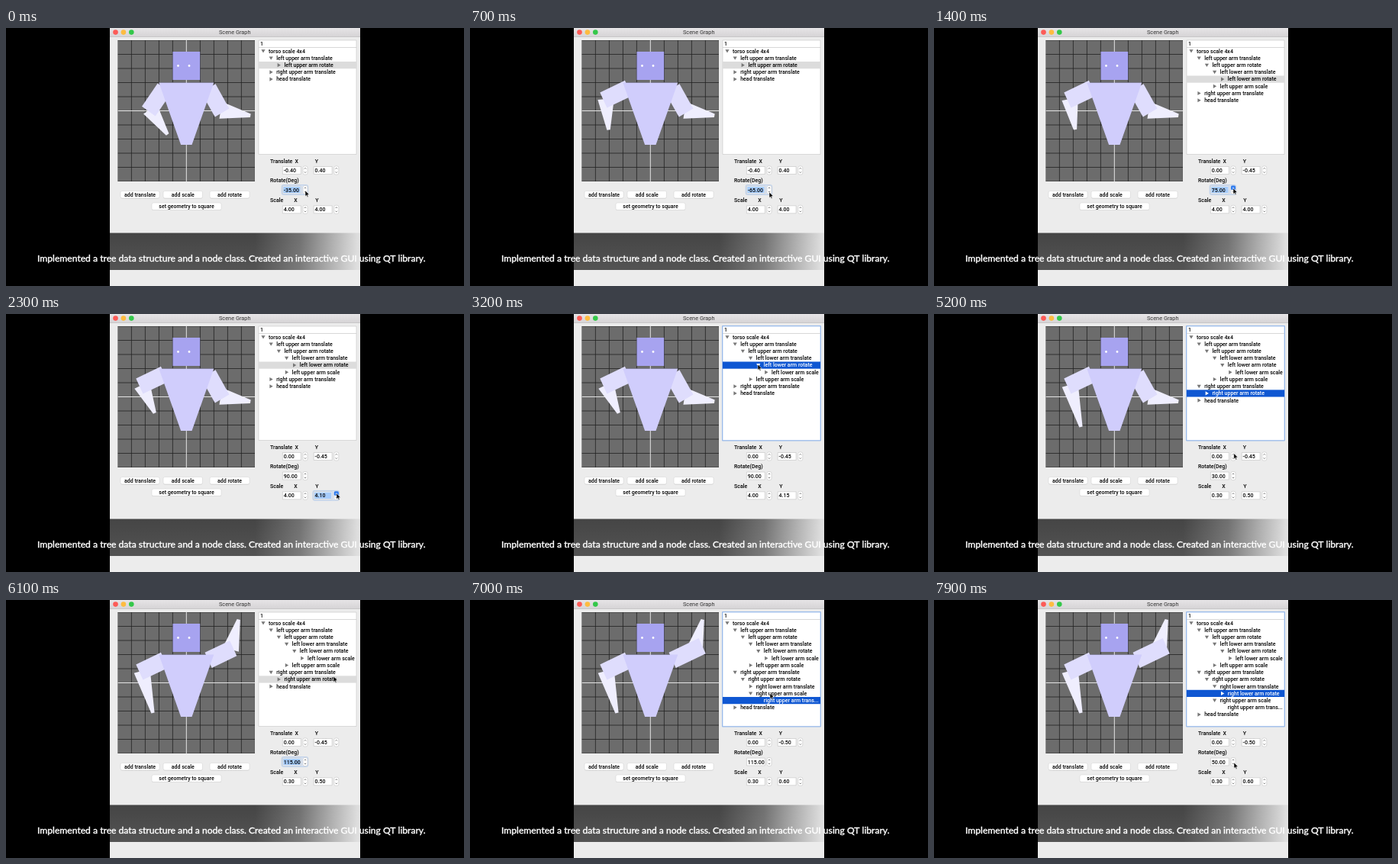
Recreate the animation shown at these times as an HTML page with a canvas. Size 600 by 338 pixels, loop 8 s.

```html
<!DOCTYPE html>
<html lang="en">
<head>
<meta charset="utf-8">
<title>Scene Graph</title>
<style>
html, body { margin: 0; width: 100%; height: 100%; overflow: hidden; background: #000; }
canvas { display: block; width: 600px; height: 338px; }
</style>
</head>
<body>
<canvas id="stage"></canvas>
<script>
const W = 600, H = 338, LOOP = 8000, STEP = 100;
const canvas = document.getElementById('stage');
const ctx = canvas.getContext('2d');
const dpr = window.devicePixelRatio || 1;
canvas.width = W * dpr;
canvas.height = H * dpr;

const UI_FONT = 'Roboto, Inter, sans-serif';

// [id, label, children]
const TREE = ['torso', 'torso scale 4x4', [
  ['lut', 'left upper arm translate', [
    ['lur', 'left upper arm rotate', [
      ['llt', 'left lower arm translate', [
        ['llr', 'left lower arm rotate', [
          ['lls', 'left lower arm scale', [[]]]]]]],
      ['lus', 'left upper arm scale', [[]]]]]]],
  ['rut', 'right upper arm translate', [
    ['rur', 'right upper arm rotate', [
      ['rlt', 'right lower arm translate', [
        ['rlr', 'right lower arm rotate', [[]]]]],
      ['rus', 'right upper arm scale', [
        ['rug', 'right upper arm trans...', []]]]]]]],
  ['head', 'head translate', [[]]]]];

const START = {
  open: 'torso lut', sel: 'lur', focus: 'rot', press: 0,
  tx: -0.4, ty: 0.4, rot: -35, sx: 4, sy: 4,
  leftUp: -35, leftLow: 70, leftLen: 0.5, rightUp: 30, rightLen: 0.5
};

const events = [];
const at = (time, change) => events.push([time, change]);

// Repeated clicks on a stepper: the field and the pose value move together.
function clicks(time, gap, field, pose, from, to, step) {
  const n = Math.round(Math.abs(to - from) / step);
  const dir = Math.sign(to - from);
  for (let i = 1; i <= n; i++) {
    const v = from + dir * step * i;
    const change = { focus: field, press: dir, [field]: v };
    if (pose) change[pose] = v;
    at(time + (i - 1) * gap, change);
  }
  at(time + n * gap, { press: 0 });
}

clicks(100, 100, 'rot', 'leftUp', -35, -65, 5);
at(900, { open: 'torso lut lur', focus: 'tree' });
at(1000, { open: 'torso lut lur llt', sel: 'llt', tx: 0, ty: -0.45 });
at(1100, { sel: 'llr', rot: 70 });
clicks(1400, 100, 'rot', 'leftLow', 70, 90, 5);
clicks(2200, 100, 'sy', null, 4, 4.15, 0.05);
at(2900, { focus: 'tree' });
at(3100, { open: 'torso lut lur llt llr' });
at(3300, { sel: 'lls', sx: 0.3, sy: 0.5 });
clicks(3500, 100, 'sy', 'leftLen', 0.5, 0.7, 0.05);
at(3900, { sel: 'llr', focus: 'tree', press: 0 });
clicks(4000, 100, 'rot', 'leftLow', 90, 105, 5);
clicks(4300, 100, 'rot', 'leftLow', 105, 80, 5);
at(4900, { sel: 'lus', focus: 'tree', sx: 0.3, sy: 0.5 });
at(5000, { open: 'torso lut lur llt llr rut' });
at(5100, { sel: 'rur', rot: 30 });
clicks(5300, 40, 'rot', 'rightUp', 30, 115, 5);
at(6200, { open: 'torso lut lur llt llr rut rur', focus: 'tree' });
at(6300, { sel: 'rus', sx: 0.3, sy: 0.5 });
clicks(6500, 100, 'sy', 'rightLen', 0.5, 0.6, 0.05);
at(6800, { open: 'torso lut lur llt llr rut rur rus', focus: 'tree' });
at(6900, { sel: 'rug', tx: 0, ty: -0.5 });
at(7300, { open: 'torso lut lur llt llr rut rur rus rlt' });
at(7500, { sel: 'rlr', rot: 50 });

// [time, x, y]
const MOUSE = [
  [0, 392, 213], [700, 392, 215], [900, 357, 48], [1000, 368, 58],
  [1100, 400, 67], [1300, 392, 210], [1800, 392, 210], [2100, 433, 235],
  [2500, 433, 235], [2900, 395, 67], [3100, 378, 66], [3200, 377, 66],
  [3300, 405, 76], [3450, 433, 235], [3800, 433, 235], [3900, 410, 67],
  [4000, 392, 210], [4200, 392, 210], [4300, 390, 213], [4700, 390, 213],
  [4900, 400, 85], [5000, 347, 94], [5100, 395, 104], [5250, 392, 210],
  [5950, 392, 210], [6100, 429, 100], [6200, 357, 104], [6300, 395, 122],
  [6450, 433, 235], [6650, 433, 235], [6800, 368, 122], [6900, 395, 131],
  [7000, 393, 122], [7300, 368, 113], [7500, 395, 122], [7900, 393, 213]
];

function stateAt(t) {
  const s = { ...START };
  for (const [time, change] of events) if (time <= t) Object.assign(s, change);
  return s;
}

function mouseAt(t) {
  const i = MOUSE.findIndex(k => k[0] > t);
  if (i < 0) return MOUSE[MOUSE.length - 1].slice(1);
  const a = MOUSE[i - 1], b = MOUSE[i];
  const u = (t - a[0]) / (b[0] - a[0]);
  const e = u * u * (3 - 2 * u);
  return [a[1] + (b[1] - a[1]) * e, a[2] + (b[2] - a[2]) * e];
}

function rect(x, y, w, h, fill) {
  ctx.fillStyle = fill;
  ctx.fillRect(x, y, w, h);
}

function box(x, y, w, h, r, fill, stroke, lw = 0.6) {
  ctx.beginPath();
  ctx.roundRect(x, y, w, h, r);
  ctx.fillStyle = fill;
  ctx.fill();
  if (!stroke) return;
  ctx.strokeStyle = stroke;
  ctx.lineWidth = lw;
  ctx.stroke();
}

function poly(points, fill) {
  ctx.beginPath();
  points.forEach(p => ctx.lineTo(p[0], p[1]));
  ctx.closePath();
  ctx.fillStyle = fill;
  ctx.fill();
}

function dot(x, y, r, fill) {
  ctx.beginPath();
  ctx.arc(x, y, r, 0, 7);
  ctx.fillStyle = fill;
  ctx.fill();
}

function text(str, x, y, color = '#000', align = 'left', font = '500 7px ') {
  ctx.font = font + UI_FONT;
  ctx.textAlign = align;
  ctx.fillStyle = color;
  ctx.fillText(str, x, y);
}

// Figure coordinates: the torso is one unit wide and y points up.
const OX = 236.3, OY = 108.5, UX = 72, UY = 74;
const place = ([x, y]) => [OX + x * UX, OY - y * UY];

function joint(x, y, deg) {
  const a = deg * Math.PI / 180, c = Math.cos(a), s = Math.sin(a);
  return ([px, py]) => [x + px * c - py * s, y + px * s + py * c];
}

function arm(side, up, low, upLen, lowLen) {
  const upper = joint(side * 0.4, 0.4, up);
  const [ex, ey] = upper([0, -0.45]);
  const lower = joint(ex, ey, up + low);
  const tip = -1.1 * lowLen;
  poly([[-0.15, 0], [0.15, 0], [0.03, tip], [-0.03, tip]].map(p => place(lower(p))), '#efeefe');
  poly([[-0.15, 0], [0.15, 0], [0.15, -upLen], [-0.15, -upLen]].map(p => place(upper(p))), '#dfddfd');
}

function drawScene(s) {
  ctx.save();
  ctx.beginPath();
  ctx.rect(146.6, 16, 179.4, 185);
  ctx.clip();
  rect(146, 16, 180, 185, '#6c6c6c');
  for (let i = -5; i <= 5; i++) {
    if (!i) continue;
    rect(OX + i * 18 - 0.4, 16, 0.8, 185, '#222');
    rect(146, OY + i * 18.5 - 0.4, 180, 0.8, '#222');
  }
  rect(OX - 0.5, 16, 1, 185, '#e4e4e4');
  rect(146, OY - 0.5, 180, 1, '#e4e4e4');
  arm(-1, s.leftUp, s.leftLow, 0.5, s.leftLen);
  arm(1, s.rightUp, 50, s.rightLen, 0.5);
  poly([[-0.5, 0.5], [0.5, 0.5], [0.1, -0.6], [-0.1, -0.6]].map(place), '#d0cdfc');
  rect(218.5, 31, 35.7, 37, '#a7a3f0');
  dot(225.5, 49.5, 1.4, '#fff');
  dot(240, 49.5, 1.4, '#fff');
  ctx.restore();
}

function drawTree(s) {
  const focus = s.focus === 'tree';
  if (focus) box(330, 15, 130, 151.5, 1, '#9dbdeb');
  box(331, 16, 128, 149.5, 0, '#fff', focus ? '#8fb4e8' : '#c4c4c4', 0.6);
  rect(331, 25, 128, 0.7, '#c8c8c8');
  text('1', 333, 23.2);
  const open = s.open.split(' ');
  let row = 0;
  const visit = ([id, label, kids], depth) => {
    const y = 30.2 + 9.22 * row++;
    const x = 344 + 10.2 * depth;
    const sel = id === s.sel, isOpen = open.includes(id);
    if (sel) rect(331, y - 4.6, 128, 9.2, focus ? '#0f57d2' : '#dcdcdc');
    const ax = x - 7, mark = sel && focus ? '#fff' : '#777';
    if (kids.length) {
      poly(isOpen
        ? [[ax - 2.6, y - 2], [ax + 2.6, y - 2], [ax, y + 2.4]]
        : [[ax - 1.8, y - 2.6], [ax + 2.5, y], [ax - 1.8, y + 2.6]], mark);
    }
    text(label, x, y + 2.4, sel && focus ? '#fff' : '#000');
    if (isOpen) kids.forEach(k => visit(k, depth + 1));
  };
  visit(TREE, 0);
}

function chevron(x, y, dir, color) {
  ctx.beginPath();
  ctx.moveTo(x - 1.2, y + dir * 0.6);
  ctx.lineTo(x, y - dir * 0.6);
  ctx.lineTo(x + 1.2, y + dir * 0.6);
  ctx.strokeStyle = color;
  ctx.lineWidth = 0.7;
  ctx.stroke();
}

function spin(s, key, x, y) {
  const focus = s.focus === key, press = focus ? s.press : 0;
  if (focus) box(x - 1.2, y - 1.4, 34.5, 12.8, 2, '#d9e4f4', '#b4cbea', 0.8);
  box(x, y, 24, 10, 0, '#fff', '#c2c2c2');
  if (focus) rect(x + 0.8, y + 0.8, 22.4, 8.4, '#a6ccfb');
  text(s[key].toFixed(2), x + 1.4, y + 7.5);
  const bx = x + 26.6;
  box(bx, y - 0.5, 6, 11, 2, '#fff', '#c6c6c6');
  if (press) box(bx, press > 0 ? y - 0.5 : y + 5, 6, 5.5, 1.5, '#2f7cf0');
  chevron(bx + 3, y + 2.5, 1, press > 0 ? '#fff' : '#444');
  chevron(bx + 3, y + 7.5, -1, press < 0 ? '#fff' : '#444');
}

function button(label, x, y, w) {
  box(x, y + 0.4, w, 9.6, 2, '#cfcfcf');
  box(x, y, w, 9.4, 2, '#fff', '#d2d2d2', 0.5);
  text(label, x + w / 2, y + 7.2, '#000', 'center');
}

function drawPanel(s) {
  button('add translate', 150, 213.5, 51);
  button('add scale', 206, 213.5, 51.5);
  button('add rotate', 267, 213.5, 52);
  button('set geometry to square', 191, 229, 91);
  text('Translate', 346, 176.8);
  text('X', 378.5, 176.8);
  text('Y', 404.7, 176.8);
  text('Rotate(Deg)', 346, 202.3);
  text('Scale', 346, 228);
  text('X', 377.3, 228);
  text('Y', 405.3, 228);
  spin(s, 'tx', 362.4, 181.5);
  spin(s, 'ty', 403.2, 181.5);
  spin(s, 'rot', 362.4, 207);
  spin(s, 'sx', 362.4, 232.8);
  spin(s, 'sy', 403.2, 232.8);
}

function drawWindow() {
  rect(0, 0, W, H, '#000');
  rect(136, 0, 328, H, '#ececec');
  const bar = ctx.createLinearGradient(0, 0, 0, 12);
  bar.addColorStop(0, '#e6e4e6');
  bar.addColorStop(1, '#d5d3d5');
  rect(136, 0, 328, 11.6, bar);
  rect(136, 11.4, 328, 0.6, '#b9b7b9');
  ['#fc5b57', '#fdbc40', '#34c84a'].forEach((c, i) => dot(143.5 + i * 10.4, 5.6, 3.3, c));
  text('Scene Graph', 299.7, 8.4, '#333', 'center', '7.4px ');
}

function drawCaption() {
  const fade = ctx.createLinearGradient(136, 0, 464, 0);
  fade.addColorStop(0, 'rgba(60,60,60,.95)');
  fade.addColorStop(0.58, 'rgba(60,60,60,.95)');
  fade.addColorStop(0.76, 'rgba(60,60,60,.7)');
  fade.addColorStop(0.9, 'rgba(60,60,60,.32)');
  fade.addColorStop(1, 'rgba(60,60,60,.06)');
  rect(136, 268.5, 328, 48.5, fade);
  const glow = ctx.createLinearGradient(0, 268, 0, 317);
  glow.addColorStop(0, 'rgba(255,255,255,0)');
  glow.addColorStop(1, 'rgba(255,255,255,.08)');
  rect(136, 268.5, 328, 48.5, glow);
  const line = 'Implemented a tree data structure and a node class. Created an interactive GUI using QT library.';
  ctx.font = '12.13px Lato, sans-serif';
  ctx.textAlign = 'left';
  ctx.fillStyle = ctx.strokeStyle = '#fff';
  ctx.lineWidth = 0.4;
  ctx.fillText(line, 41, 306);
  ctx.strokeText(line, 41, 306);
}

function drawMouse([x, y]) {
  const shape = [[0, 0], [0, 7.4], [1.7, 5.9], [2.8, 8.4], [4, 7.9], [2.9, 5.4], [5.2, 5.3]];
  poly(shape.map(p => [x + p[0], y + p[1]]), '#000');
  ctx.strokeStyle = '#fff';
  ctx.lineWidth = 0.5;
  ctx.stroke();
}

function draw(t) {
  const s = stateAt(t);
  ctx.setTransform(dpr, 0, 0, dpr, 0, 0);
  drawWindow();
  drawScene(s);
  drawTree(s);
  drawPanel(s);
  drawCaption();
  drawMouse(mouseAt(t));
}

const begin = performance.now();
function tick() {
  const t = (performance.now() - begin) % LOOP;
  draw(Math.floor(t / STEP) * STEP);
  requestAnimationFrame(tick);
}
tick();
</script>
</body>
</html>
```
